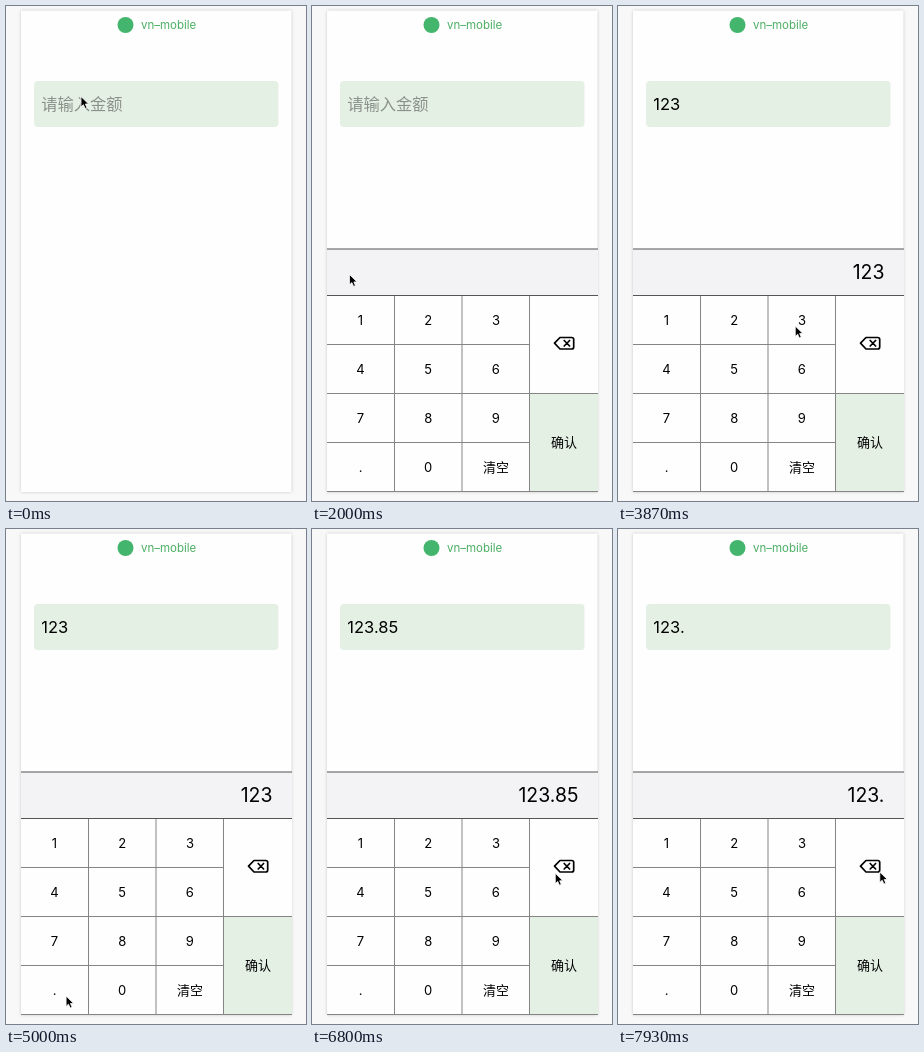
Recreate the animation shown at these times as an HTML page. Size 300 px wide and 495 px high, loop 8 s.

```html
<!DOCTYPE html>
<html lang="zh">
<head>
<meta charset="utf-8">
<title>Number keyboard</title>
<style>
  html, body { margin: 0; width: 100%; height: 100%; overflow: hidden; background: #f8f8f8; }
  svg { display: block; width: 300px; height: 495px; font-family: Inter, "Noto Sans CJK SC", "Noto Sans CJK", sans-serif; }
  .phone { fill: #fefefe; filter: drop-shadow(0 0 1.5px rgba(0, 0, 0, .2)); }
  .line { stroke: #858585; fill: none; }
  .edge { stroke: #555; stroke-width: 1.2; }
  .key { font-size: 13px; text-anchor: middle; }
  .icon { fill: none; stroke: #000; stroke-width: 1.7; stroke-linejoin: round; stroke-linecap: round; }
</style>
</head>
<body>
<svg viewBox="0 0 300 495">
  <clipPath id="screen"><rect x="15" y="4" width="271" height="482"/></clipPath>
  <rect class="phone" x="15" y="4.5" width="270.5" height="481.5"/>
  <circle cx="119.5" cy="19" r="8" fill="#43b56c"/>
  <text x="135" y="23.2" font-size="11.5" fill="#4caf64">vn–mobile</text>
  <rect x="28" y="75" width="244.5" height="46" rx="4" fill="#e5f0e5"/>
  <text id="hint" x="35.2" y="104.4" font-size="16.3" fill="#8b908b">请输入金额</text>
  <text id="field" x="35.3" y="104.2" font-size="16.5"></text>
  <g clip-path="url(#screen)">
    <g id="panel">
      <rect x="15" y="243" width="271" height="47" fill="#f3f2f4"/>
      <rect x="15" y="290" width="271" height="196" fill="#fefefe"/>
      <rect x="218" y="387" width="68" height="99" fill="#e5f0e5"/>
      <rect id="press" fill="#ebebeb"/>
      <path class="line" d="M15 338.5H218M15 387.5H286M15 436.5H218M15 485.5H286M82.5 290V486M150 290V486M217.5 290V486"/>
      <path class="line edge" d="M15 243H286M15 289.5H286"/>
      <g id="keys"></g>
      <path class="icon" d="M242.5 337.2L248 331.5H259.7Q261.7 331.5 261.7 333.5V341Q261.7 343 259.7 343H248ZM252.2 334.5L257.6 340M257.6 334.5L252.2 340"/>
      <text id="total" x="266.4" y="273.3" font-size="19.4" text-anchor="end"></text>
    </g>
  </g>
  <path id="cursor" d="M0 0V10.4L2.4 8.2L4.1 12L6 11.2L4.4 7.5H7.6Z" stroke="#fff" stroke-width=".8"/>
</svg>
<script>
  const LOOP = 8000, OPEN = 1400, SLIDE = 300;
  const HOLD = 100;               // how long a key stays pressed
  const TRAVEL = 520, LEAD = 180; // pointer move, and its rest before a tap
  const COL = 67.7, ROW = 49, BACK = "<";
  const $ = id => document.getElementById(id);
  const ease = p => p * p * (3 - 2 * p);
  const clamp = p => Math.min(1, Math.max(0, p));

  function setAttrs(el, attrs) {
    for (const name in attrs) el.setAttribute(name, attrs[name]);
  }

  function addLabel(label, x, y) {
    const el = document.createElementNS("http://www.w3.org/2000/svg", "text");
    setAttrs(el, { class: "key", x, y });
    el.textContent = label;
    $("keys").append(el);
  }

  const labels = [..."123456789.0", "清空"];

  // Centre and cell of a key on the pad
  function keyAt(label) {
    if (label === BACK) return { x: 263, y: 337, col: 3, row: 0 };
    const i = labels.indexOf(label), col = i % 3, row = Math.floor(i / 3);
    return { x: 48.5 + col * COL, y: 314 + row * ROW, col, row };
  }

  labels.forEach(label => {
    const { x, y } = keyAt(label);
    addLabel(label, x, y + 4.8);
  });
  addLabel("确认", 252, 440.8);

  const taps = [
    [2530, "1"], [3150, "2"], [3700, "3"], [5180, "."],
    [5600, "8"], [6000, "5"], [7050, BACK], [7530, BACK]
  ];

  // Pointer stops: it rests just under each label, a little short of its centre
  const stops = [{ at: 0, x: 75, y: 90.5 }, { at: 530, x: 66, y: 96 }, { at: 1950, x: 37, y: 266 }];
  for (const [time, label] of taps) {
    const from = stops[stops.length - 1].x, { x, y } = keyAt(label);
    stops.push({ at: time - LEAD, x: x + (from - x) * .09, y: y + 6, leave: time + 70 });
  }

  function pointer(t) {
    const i = stops.findIndex(s => s.at > t);
    if (i < 0) return stops[stops.length - 1];
    const a = stops[i - 1], b = stops[i];
    const start = Math.max(a.leave || a.at, b.at - TRAVEL);
    const p = ease(clamp((t - start) / (b.at - start)));
    return { x: a.x + (b.x - a.x) * p, y: a.y + (b.y - a.y) * p };
  }

  function valueAt(t) {
    return taps.filter(([time]) => time <= t)
      .reduce((text, [, label]) => label === BACK ? text.slice(0, -1) : text + label, "");
  }

  function showPress(t) {
    const tap = taps.find(([time]) => t >= time - HOLD && t < time);
    $("press").style.display = tap ? "" : "none";
    if (!tap) return;
    const { col, row } = keyAt(tap[1]);
    setAttrs($("press"), {
      x: 15 + col * COL, y: 290 + row * ROW,
      width: COL, height: col === 3 ? 2 * ROW : ROW
    });
  }

  function draw(t) {
    const value = valueAt(t), { x, y } = pointer(t);
    const open = ease(clamp((t - OPEN) / SLIDE));
    $("field").textContent = $("total").textContent = value;
    $("hint").style.display = value ? "none" : "";
    setAttrs($("panel"), { transform: `translate(0 ${(1 - open) * 246})` });
    setAttrs($("cursor"), { transform: `translate(${x} ${y})` });
    showPress(t);
  }

  const start = performance.now();
  function tick() {
    draw((performance.now() - start) % LOOP);
    requestAnimationFrame(tick);
  }
  tick();
</script>
</body>
</html>
```
